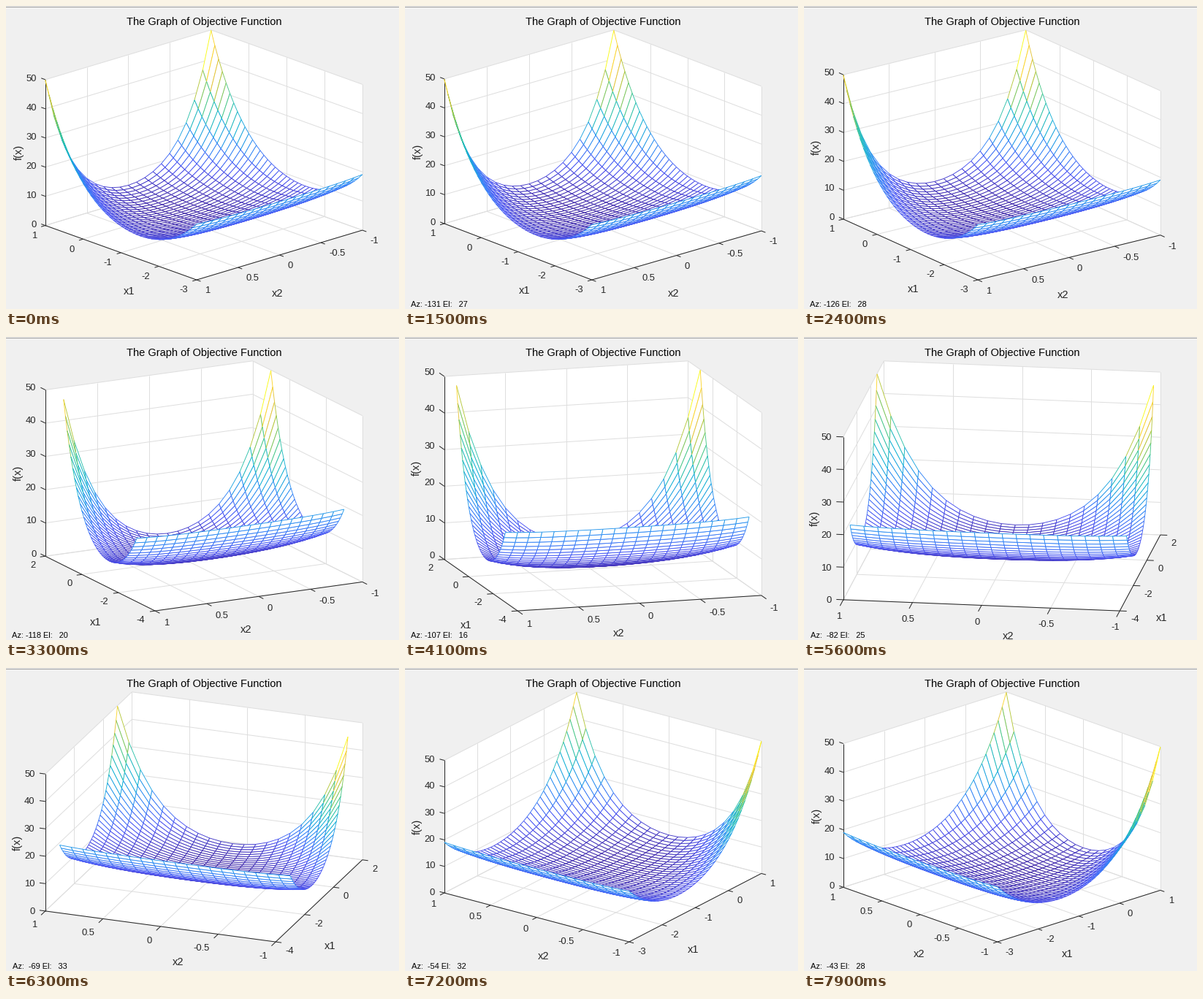
These frames come from a looping animation (538 by 415 pixels, 8000 ms). A matplotlib script:

```python
import numpy as np
import matplotlib.pyplot as plt
from matplotlib.animation import FuncAnimation
from matplotlib.collections import LineCollection, PolyCollection
from matplotlib.colors import LinearSegmentedColormap
from matplotlib.patches import Rectangle

W, H, DPI = 538, 415, 100
LEFT, RIGHT, TOP, BOTTOM = 53.8, 487.8, 32.8, 375.1
PX = 72 / DPI
PAPER, INK, GRID = "#f0f0f0", "#262626", "#dedede"
FRAMES, STEP_MS = 80, 100

plt.rcParams["font.family"] = "Liberation Sans"
plt.rcParams["axes.unicode_minus"] = False

# Camera keys: seconds, azimuth, elevation
KEYS = np.array([(1.2, -132.4, 26.8), (2.4, -126.4, 27.6), (3.3, -117.9, 20.4),
                 (4.8, -95.4, 16.4), (6.3, -69.4, 32.6), (7.2, -54.4, 32.4),
                 (7.9, -43.4, 27.6)])
TIMES, POSES = KEYS[:, 0], KEYS[:, 1:]
SLOPES = np.gradient(POSES, TIMES, axis=0)

ramp = LinearSegmentedColormap.from_list("ramp", [
    "#3e26a8", "#4852f4", "#2e87f7", "#12b1d6", "#37c897", "#abc739", "#fec338", "#f9fb15"])

X1, X2 = np.meshgrid(np.linspace(-3, 1, 41), np.linspace(-1, 1, 21), indexing="ij")
F = np.exp(X1 + 3 * X2 - 0.1) + np.exp(X1 - 3 * X2 - 0.1) + np.exp(-X1 - 0.1)
COLORS = ramp((F - F.min()) / (F.max() - F.min()))
CUBE = np.array(list(np.ndindex(2, 2, 2)), float)

# Per cell: one fill, then its four edges
PARTS = np.array([[0, 1, 2, 3], [0, 0, 1, 1], [1, 1, 2, 2], [3, 3, 2, 2], [0, 0, 3, 3]])
EDGE_FROM = PARTS[:, 0]


def camera(t):
    """Smooth path through the camera keys."""
    t = np.clip(t, TIMES[0], TIMES[-1])
    i = min(np.searchsorted(TIMES, t, side="right") - 1, len(TIMES) - 2)
    h = TIMES[i + 1] - TIMES[i]
    s = (t - TIMES[i]) / h
    return ((1 + 2 * s) * (1 - s) ** 2 * POSES[i] + s * (1 - s) ** 2 * h * SLOPES[i]
            + s * s * (3 - 2 * s) * POSES[i + 1] + s * s * (s - 1) * h * SLOPES[i + 1])


def make_projector(az, el):
    """Orthographic view of the unit cube, stretched to fill the plot area."""
    a, e = np.radians([az, el])
    view = np.array([[np.cos(a), np.sin(a), 0],
                     [-np.sin(e) * np.sin(a), np.sin(e) * np.cos(a), np.cos(e)]])
    box = CUBE @ view.T
    lo, span = box.min(0), np.ptp(box, axis=0)

    def project(points):
        q = (np.asarray(points, float) @ view.T - lo) / span
        return np.stack([LEFT + q[..., 0] * (RIGHT - LEFT),
                         BOTTOM - q[..., 1] * (BOTTOM - TOP)], -1)
    return project


def cells(grid, flip):
    """Corners of every cell, ordered from far to near."""
    c = np.stack([grid[:-1, :-1], grid[1:, :-1], grid[1:, 1:], grid[:-1, 1:]], 2)
    c = c[::-1, ::-1] if flip else c[::-1]
    return c.reshape(-1, 4, grid.shape[-1])


def unit(v):
    return v / np.hypot(*v)


fig = plt.figure(figsize=(W / DPI, H / DPI), dpi=DPI, facecolor=PAPER)
ax = fig.add_axes([0, 0, 1, 1])
ax.set(xlim=(0, W), ylim=(H, 0))
ax.axis("off")


def label(size, text="", color=INK, ha="center", **kw):
    return ax.text(0, 0, text, fontsize=size * PX, color=color, ha=ha, **{"zorder": 5, **kw})


def place(item, x, y):
    """Put the middle of the capitals at height y."""
    item.set_position((x, y + 0.36 * item.get_fontsize() / PX))


walls = ax.add_collection(PolyCollection([], facecolors="white", edgecolors="none", zorder=1))
grid_lines = ax.add_collection(LineCollection([], colors=GRID, linewidths=PX, zorder=2))
axis_lines = ax.add_collection(LineCollection([], colors=INK, linewidths=PX, zorder=3))
mesh = ax.add_collection(PolyCollection(
    [], facecolors=["white"] + ["none"] * 4, linewidths=[0] + [0.9 * PX] * 4, zorder=4))
ax.plot([0, W], [1, 1], color="#a0a0a0", lw=PX)

title = label(14.67, "The Graph of Objective Function", "black")
place(title, 271, 20.5)
name1, name2 = label(14.67, "x1"), label(14.67, "x2")
name_f = label(14.67, "f(x)", va="center", rotation=90)
tick_texts = [label(13) for _ in range(18)]
readout_back = ax.add_patch(Rectangle((0, 400), 104, 15, color=PAPER, lw=0, zorder=6))
readout = label(11, color="black", zorder=7)
place(readout, 46.5, 408.5)


def x1_limits(length):
    """Coarser ticks as the axis gets shorter on screen."""
    step = 1 if length > 185 else 2 if length > 105 else 5
    return step, np.floor(-3 / step) * step, np.ceil(1 / step) * step


def put_tick(item, value, p, u, reach, upright):
    item.set_text(f"{value:g}")
    x, y = p + u * reach
    steep = abs(u[1]) > 1.7 * abs(u[0])
    if upright:
        ha, dx, dy = "right", -3, 0.5
    elif steep:
        ha, dx, dy = "center", 0, 10
    elif u[0] > 0:
        ha, dx, dy = "left", 2, 10
    else:
        ha, dx, dy = "right", -3, 10
    item.set_ha(ha)
    place(item, x + dx, y + dy)


def draw(k):
    az, el = camera(k * STEP_MS / 1000)
    project = make_projector(az, el)
    near = int(az < -90)
    far = 1 - near

    front = project([0, near, 0])
    along1 = project([1, near, 0]) - front
    along2 = project([0, far, 0]) - front
    step, lo, hi = x1_limits(np.hypot(*along1))

    v1 = np.arange(lo, hi + step / 2, step)
    v2 = np.linspace(-1, 1, 5)
    vz = np.arange(0, 51, 10)
    s1, s2, sz = (v1 - lo) / (hi - lo), (v2 + 1) / 2, vz / 50

    walls.set_verts(project([
        [(0, 0, 0), (1, 0, 0), (1, 1, 0), (0, 1, 0)],
        [(1, 0, 0), (1, 1, 0), (1, 1, 1), (1, 0, 1)],
        [(0, far, 0), (1, far, 0), (1, far, 1), (0, far, 1)]]))

    lines = []
    for s in s1:
        lines += [[(s, 0, 0), (s, 1, 0)], [(s, far, 0), (s, far, 1)]]
    for s in s2:
        lines += [[(0, s, 0), (1, s, 0)], [(1, s, 0), (1, s, 1)]]
    for s in sz:
        lines += [[(1, 0, s), (1, 1, s)], [(0, far, s), (1, far, s)]]
    grid_lines.set_segments(project(lines))

    # Axes, ticks and tick labels
    pts1 = project([(s, near, 0) for s in s1])
    pts2 = project([(0, s, 0) for s in s2])
    ptsz = project([(near, 1, s) for s in sz])
    tick = 0.025 * max(np.hypot(*(p[-1] - p[0])) for p in (pts1, pts2, ptsz))
    reach = tick + 3.5
    segments, pool = [], iter(tick_texts)
    for values, pts, u, upright in ((v1, pts1, unit(-along2), False),
                                    (v2, pts2, unit(-along1), False),
                                    (vz, ptsz, unit(ptsz[0] - front), True)):
        segments.append(pts[[0, -1]])
        for v, p in zip(values, pts):
            segments.append([p, p + u * tick])
            put_tick(next(pool), v, p, u, reach, upright)
    for spare in pool:
        spare.set_text("")
    axis_lines.set_segments(segments)

    # Axis names drift sideways as the view turns away from face-on
    turn, side = abs(az + 90), np.sign(az + 90)
    x, y = front + along1 / 2
    place(name1, x + side * (40 - 1.2 * turn), y + 63.5 - 0.28 * turn + 0.5 * (el - 27))
    x, y = front + along2 / 2
    place(name2, x + side * (45 - turn), y + 40 + 0.27 * turn + 0.4 * (el - 27))
    name_f.set_position((25 - 0.8 * reach, ptsz[:, 1].mean()))

    # Surface
    pts = project(np.stack([(X1 - lo) / (hi - lo), (X2 + 1) / 2, F / 50], -1))
    flip = near == 0
    mesh.set_verts(cells(pts, flip)[:, PARTS].reshape(-1, 4, 2), closed=False)
    mesh.set_edgecolor(cells(COLORS, flip)[:, EDGE_FROM].reshape(-1, 4))

    dragging = k * STEP_MS >= 700
    readout.set_text(f"Az: {az:4.0f} El: {el:4.0f}")
    readout.set_visible(dragging)
    readout_back.set_visible(dragging)
    return []


anim = FuncAnimation(fig, draw, frames=FRAMES, interval=STEP_MS, init_func=lambda: [],
                     repeat=True, repeat_delay=0, blit=False)
plt.show()
```
